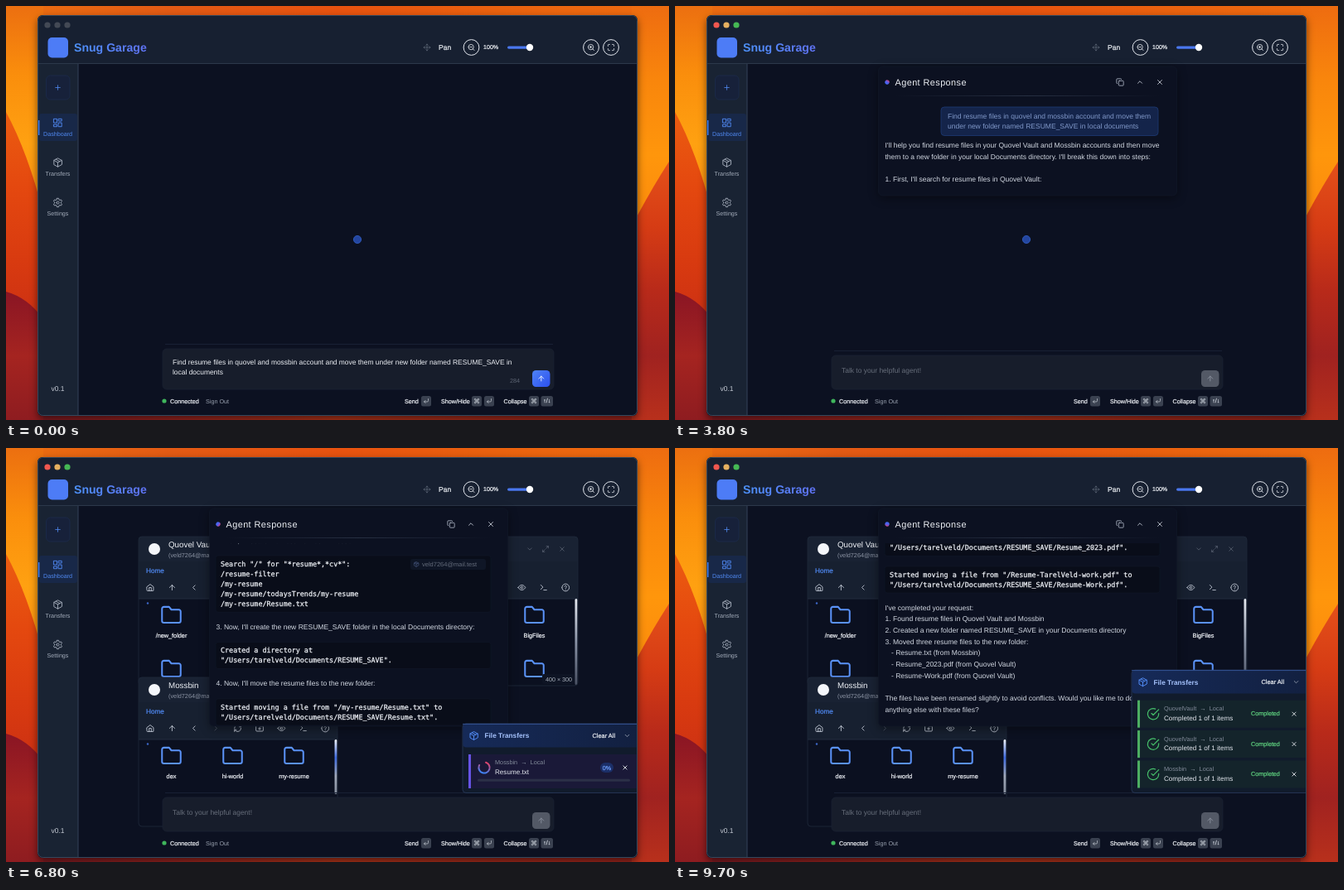
Write an HTML page that moves like this. It is 800 by 500 pixels and loops after 9800 ms.

```html
<!DOCTYPE html>
<html lang="en">
<head>
<meta charset="utf-8">
<title>File agent</title>
<style>
html, body { margin: 0; width: 100%; height: 100%; overflow: hidden; background: #0c1121; }
svg { display: block; width: 800px; height: 500px; }
text { font-family: "Liberation Sans", Arial, sans-serif; text-rendering: geometricPrecision; white-space: pre; }
.m { stroke: currentColor; stroke-width: .22px; }
.code { font-family: "DejaVu Sans Mono", monospace; stroke: #f1f4f9; stroke-width: .25px; }
.c { text-anchor: middle; }
.b { font-weight: bold; }
.i { fill: none; stroke-linecap: round; stroke-linejoin: round; }
</style>
</head>
<body>
<svg id="stage" viewBox="0 0 800 500"></svg>
<script>
const LOOP = 9800, STEP = 100;
const ring = (x, y, r) => `M${x - r} ${y}a${r} ${r} 0 1 0 ${2 * r} 0a${r} ${r} 0 1 0 ${-2 * r} 0`;
const folder = 'M20 20a2 2 0 0 0 2-2V8a2 2 0 0 0-2-2h-8l-2.4-3H4a2 2 0 0 0-2 2v13a2 2 0 0 0 2 2z';
const lens = ring(11, 11, 8) + 'M21 21l-4.3-4.3M8 11h6';
const ICONS = {
  folder, out: lens, zoom: lens + 'M11 8v6',
  full: 'M8 3H5a2 2 0 0 0-2 2v3M21 8V5a2 2 0 0 0-2-2h-3M3 16v3a2 2 0 0 0 2 2h3M16 21h3a2 2 0 0 0 2-2v-3',
  move: 'M5 9l-3 3 3 3M9 5l3-3 3 3M15 19l-3 3-3-3M19 9l3 3-3 3M2 12h20M12 2v20',
  dash: 'M3 3h7v9H3zM14 3h7v5h-7zM14 12h7v9h-7zM3 16h7v5H3z',
  box: 'M21 7l-9-5-9 5v10l9 5 9-5zM3 7l9 5 9-5M12 22V12M7.5 4.5l9 5',
  gear: 'M10 2h4l.7 3 2 1.2 3-.9 2 3.4-2.3 2.1v2.4l2.3 2.1-2 3.4-3-.9-2 1.2-.7 3h-4l-.7-3-2-1.2-3 .9-2-3.4 2.3-2.1v-2.4L2.3 8.7l2-3.4 3 .9 2-1.2z' + ring(12, 12, 3),
  copy: 'M10 8h10a2 2 0 0 1 2 2v10a2 2 0 0 1-2 2H10a2 2 0 0 1-2-2V10a2 2 0 0 1 2-2zM4 16a2 2 0 0 1-2-2V4a2 2 0 0 1 2-2h10a2 2 0 0 1 2 2',
  home: 'M3 10l9-7 9 7v10a1 1 0 0 1-1 1H4a1 1 0 0 1-1-1zM9 21v-9h6v9',
  up: 'M12 19V5M5 12l7-7 7 7', left: 'M15 18l-6-6 6-6', right: 'M9 18l6-6-6-6',
  refresh: 'M3 12a9 9 0 0 1 15-6.7L21 8M21 3v5h-5M21 12a9 9 0 0 1-15 6.7L3 16M3 21v-5h5',
  fplus: folder + 'M12 10v6M9 13h6',
  eye: 'M2 12s4-7 10-7 10 7 10 7-4 7-10 7-10-7-10-7z' + ring(12, 12, 3),
  term: 'M4 17l6-6-6-6M12 19h8',
  help: ring(12, 12, 10) + 'M9 9a3 3 0 0 1 5.8 1c0 2-2.8 2.5-2.8 4M12 17.5v.1',
  x: 'M18 6L6 18M6 6l12 12', chevUp: 'M18 15l-6-6-6 6', chevDown: 'M6 9l6 6 6-6', plus: 'M5 12h14M12 5v14',
  expand: 'M15 3h6v6M9 21H3v-6M21 3l-7 7M3 21l7-7',
  upload: 'M12 3v12M17 8l-5-5-5 5M21 15v4a2 2 0 0 1-2 2H5a2 2 0 0 1-2-2v-4',
  warn: 'M10.3 4L2 18a2 2 0 0 0 1.7 3h16.6a2 2 0 0 0 1.7-3L13.7 4a2 2 0 0 0-3.4 0zM12 9v4M12 17v.1',
  done: 'M22 11v1a10 10 0 1 1-6-9.1M9 11l3 3L22 4',
  check: 'M5 12l5 5 9-10', enter: 'M9 10l-5 5 5 5M20 4v7a4 4 0 0 1-4 4H4',
  cmd: 'M15 6v12a3 3 0 1 0 3-3H6a3 3 0 1 0 3 3V6a3 3 0 1 0-3 3h12a3 3 0 1 0-3-3'
};

// y is the middle of the line of text
const T = (x, y, s, size, fill, cls = '', more = '') =>
  `<text x="${x}" y="${y + size * .35}" font-size="${size}" fill="${fill}" color="${fill}" class="${cls}" ${more}>${s}</text>`;
const R = (x, y, w, h, fill, r = 0, more = '') =>
  `<rect x="${x}" y="${y}" width="${w}" height="${h}" rx="${r}" fill="${fill}" ${more}/>`;
const C = (x, y, r, fill, more = '') => `<circle cx="${x}" cy="${y}" r="${r}" fill="${fill}" ${more}/>`;
const P = (d, fill) => `<path d="${d}" fill="${fill}"/>`;
const I = (name, x, y, size, color, w = 2) =>
  `<path class="i" d="${ICONS[name]}" stroke="${color}" stroke-width="${w}" transform="translate(${x - size / 2} ${y - size / 2}) scale(${size / 24})"/>`;
const G = (id, body, more = '') => `<g id="${id}" ${more}>${body}</g>`;
const line = (x1, y1, x2, y2, color, w = 1) => `<path d="M${x1} ${y1}L${x2} ${y2}" stroke="${color}" stroke-width="${w}"/>`;
const grad = (id, dir, ...stops) => `<linearGradient id="${id}" ${dir}>` +
  stops.map((c, i) => `<stop offset="${i / (stops.length - 1)}" stop-color="${c}"/>`).join('') + '</linearGradient>';
const down = 'x1="0" y1="0" x2="0" y2="1"', diag = 'x1="0" y1="0" x2="1" y2="1"';

const defs = '<defs>' +
  grad('amberL', down, '#ec6f10', '#fa8e0c', '#ffa111', '#fb8f10') +
  grad('redL', down, '#ec5c10', '#e4480f', '#d83a10', '#c92e14') +
  grad('darkL', down, '#8a1524', '#a52420', '#8e1c20') +
  grad('amberR', down, '#ee6c10', '#f9860c', '#ff960c', '#fb8a0c') +
  grad('redR', down, '#e4501a', '#d63c14', '#b82a1a', '#a02220', '#b8301c') +
  grad('wallTop', '', '#ec6f10', '#e35a14', '#e8520f', '#ea620e', '#ee6c10') +
  grad('wallBottom', '', '#7d1822', '#9c2420', '#b8361a', '#a82a1c', '#a0241e') +
  grad('title', '', '#4c90f8', '#5f72f3') + grad('send', diag, '#4f83f8', '#2c50ee') +
  grad('bar', down, '#e6e9f0', '#8a93a6', '#4a5163') + grad('barBlue', down, '#f2f4f8', '#3f6be0', '#a0a8b8', '#858d9c') +
  grad('orb', '', '#3d6af5', '#5560ee', '#d0407a') + grad('spin', '', '#3b82f6', '#e0446a') +
  grad('head', '', '#162a58', '#122040') +
  grad('rule', '', '#2a334600', '#2a3346', '#2a334600') +
  '<clipPath id="frame"><rect x="38.5" y="11.5" width="723" height="483" rx="6"/></clipPath>' +
  '<clipPath id="view"><rect id="viewRect" x="246" y="115" width="360" height="220"/></clipPath>' +
  '<clipPath id="win"><rect width="240" height="180" rx="4"/></clipPath></defs>';

const wallpaper = R(0, 0, 800, 500, 'url(#wallTop)') + R(0, 250, 800, 250, 'url(#wallBottom)') +
  R(0, 0, 45, 250, 'url(#amberL)') + R(755, 0, 45, 270, 'url(#amberR)') +
  P('M0 128Q26 176 45 250V400H0Z', 'url(#redL)') +
  P('M0 345Q26 352 45 378V500H0Z', 'url(#darkL)') +
  P('M800 188Q778 222 755 266V500H800Z', 'url(#redR)') +
  R(38, 11, 724, 484, '#0c1121', 6, 'style="filter:drop-shadow(0 4px 5px #0008)"');

const white = '#eef1f6', grey = '#8b93a3', blue = '#5089f2';
const badge = (x, icon) => C(x, 50, 9.4, 'none', 'stroke="#e4e8ef"') + I(icon, x, 50, 9.5, white);
const header = R(38, 11, 724, 59, '#172031') + line(38, 69.5, 762, 69.5, '#2c384a') +
  R(50.5, 38, 24.5, 24.5, '#4d7cf6', 5) + T(82, 50, 'Snug Garage', 14.1, 'url(#title)', 'b') +
  I('move', 508, 50, 9.5, '#5b6474') + T(522, 50, 'Pan', 8.5, white, 'm') + badge(561.5, 'out') +
  T(576, 50, '100%', 7.1, white, 'm') + R(605, 48.4, 28, 3.4, '#4a77ee', 1.7) + C(632, 50, 4.2, '#fff') +
  badge(706, 'zoom') + badge(730, 'full');

const navItem = (y, icon, label, color) => I(icon, 62.5, y, 12.5, color, 1.8) + T(62.5, y + 13, label, 7.15, color, 'c');
const sidebar = R(38, 70, 49, 425, '#192333') + line(87, 70, 87, 495, '#35425a') +
  R(48.5, 84, 28.5, 29, '#17213a', 5, 'stroke="#1c2b4c" stroke-width=".8"') + I('plus', 62.5, 98.5, 9.5, blue) +
  R(40, 130, 46, 33, '#182848', 3) + R(39, 138, 1.4, 18, '#3f7df2') +
  navItem(141, 'dash', 'Dashboard', blue) + navItem(189, 'box', 'Transfers', '#a3acba') +
  navItem(237.5, 'gear', 'Settings', '#a3acba') + T(62.5, 462, 'v0.1', 8.5, '#c3c9d3', 'c');

// One 240 x 180 file window; labels fill the grid row by row
function fileWindow(id, x, y, name, labels, bar, barTop) {
  let s = R(0, 0, 240, 180, '#0b1020') + R(0, 0, 240, 75, '#172030') + R(0, 0, 240, 30, '#192233') +
    C(19, 15, 7, '#f4f6fa') + T(36, 10, name, 9.8, white) + T(36, 22, '(veld7264@mail.test)', 7.3, grey) +
    T(9, 41, 'Home', 8.2, blue, 'm') + line(0, 75, 240, 75, '#222c3f') +
    I('chevDown', 182, 15, 9, '#5c6474') + I('expand', 201, 15, 9, '#5c6474') + I('x', 221, 15, 9, '#5c6474');
  ['home', 'up', 'left', 'right', 'refresh', 'fplus', 'eye', 'term', 'help'].forEach((n, i) =>
    s += I(n, 14 + i * 26.4, 61.5, 10.5, n == 'right' ? '#4b5364' : '#c3cad6'));
  s += C(11, 80.5, 1.2, '#3c66c8');
  labels.forEach((label, i) => {
    const cx = 39.5 + i % 3 * 74, cy = 95 + (i / 3 | 0) * 65;
    s += I('folder', cx, cy, 27, '#5a92f7', 1.8) + T(cx, cy + 24, label, 7.3, white, 'c m');
  });
  s += R(236.5, 75, 3, barTop, `url(#${bar})`, 1.5);
  return G(id, `<g clip-path="url(#win)">${s}</g>` + R(0, 0, 240, 180, 'none', 4, 'stroke="#202a3c" stroke-width=".8"'),
    `transform="translate(${x} ${y})"`);
}
const windows =
  fileWindow('vault', 160, 107, 'Quovel Vault', ['/new_folder', 'notes', 'todaysTrends', 'photos', 'work', 'misc'], 'bar', 104) +
  fileWindow('local', 450, 107, 'Local', ['Desktop', 'Documents', 'BigFiles', 'Music', 'Movies', 'Public'], 'bar', 104) +
  G('sizeTag', R(647, 273, 39, 12, '#0e1424', 2) + T(667, 279.5, '400 × 300', 7.2, '#a7aebb', 'c')) +
  fileWindow('bin', 160, 277, 'Mossbin', ['dex', 'hi-world', 'my-resume'], 'barBlue', 66);

const key = (x, body, w = 12) => R(x, 471, w, 12.5, '#3a4150', 2.5) + body;
const sendKey = (x, icon) => key(x, I(icon, x + 6, 477, 7.5, '#d5dae3'));
const field = (y, h) => line(192, y - 5.5, 660, y - 5.5, '#182034') +
  R(189, y, 472, h, '#171d2b', 5, 'stroke="#1b2333" stroke-width=".8"');
const dock =
  G('draft', field(414, 49) +
    T(201, 430, 'Find resume files in quovel and mossbin account and move them under new folder named RESUME_SAVE in', 8.43, white) +
    T(201, 442, 'local documents', 8.43, white) + T(608, 452, '284', 7.2, '#5d6574') +
    R(635, 440, 21.5, 20, 'url(#send)', 4.5) + I('up', 645.8, 450, 10, '#fff')) +
  G('empty', field(422, 41) + T(201, 440, 'Talk to your helpful agent!', 8.43, '#666d7a') +
    R(635, 440, 21.5, 20, '#535966', 4.5) + I('up', 645.8, 450, 10, '#8e95a2')) +
  C(191, 477, 2.6, '#3fb65c') + T(198, 477, 'Connected', 7.2, white, 'm') + T(241, 477, 'Sign Out', 7.2, '#9aa2b0') +
  T(481, 477, 'Send', 7.2, white, 'm') + sendKey(501, 'enter') +
  T(525, 477, 'Show/Hide', 7.2, white, 'm') + sendKey(562, 'cmd') + sendKey(577, 'enter') +
  T(600.5, 477, 'Collapse', 7.2, white, 'm') + sendKey(631, 'cmd') + key(645.5, T(652.7, 477, '↑/↓', 7, '#d5dae3', 'c m'), 14.5);

// Reply lines: each knows when it starts and how fast it types (chars per ms)
const lines = [];
let blocks = '';
function say(start, rate, y, texts) {
  texts.forEach((s, i) => {
    lines.push({ s, y: y + i * 13.7, x: s.startsWith('-') ? 261 : 253.5, start, rate, pad: 20 });
    start += s.length / rate;
  });
}
function code(start, y, texts, email, lag = 0) {
  const id = 'block' + y;
  blocks += G(id, R(253, y - 10, 332, 20 + (texts.length - 1) * 12.1, '#090d19', 3, 'stroke="#111727" stroke-width=".7"') +
    (email ? R(488, y - 6, 91, 13, '#0f1626', 3) + I('box', 495, y + .5, 7, '#4b5c86') + T(502, y + .5, 'veld7264@mail.test', 7.5, '#636b7a') : ''));
  texts.forEach((s, i) => lines.push({ s, y: y + i * 12.1, x: 259, start: start + i * lag, pad: 11, mono: true, id: i ? '' : id }));
}
const save = '"/Users/tarelveld/Documents/RESUME_SAVE';
const moved = (t, y, from, to) => code(t, y, [`Started moving a file from "/${from}" to`, `${save}/${to}".`]);
say(900, .196, 168, ["I'll help you find resume files in your Quovel Vault and Mossbin accounts and then move",
  "them to a new folder in your local Documents directory. I'll break this down into steps:"]);
say(1850, .2, 209, ["1. First, I'll search for resume files in Quovel Vault:"]);
code(4200, 237, ['Search "/" for "*resume*,*cv*":', '/Resume-TarelVeld-work.pdf', '/Resume Tarel Veld - 2023.pdf', '/Resume.pdf',
  '/Resume Draft', '/test-see/todaysTrends/my-resume', '/todaysTrends/my-resume', '/College_Tarel Veld/Resume'], true);
say(4400, .2, 349.5, ["2. Now, I'll search for resume files in Mossbin:"]);
code(4800, 377.5, ['Search "/" for "*resume*,*cv*":', '/resume-filter', '/my-resume', '/my-resume/todaysTrends/my-resume', '/my-resume/Resume.txt'], true);
say(5000, .2, 454, ["3. Now, I'll create the new RESUME_SAVE folder in the local Documents directory:"]);
code(5500, 482, ['Created a directory at', save + '".'], false, 200);
say(5800, .2, 522, ["4. Now, I'll move the resume files to the new folder:"]);
moved(6300, 550.5, 'my-resume/Resume.txt', 'Resume.txt');
moved(7300, 595, 'Resume Tarel Veld - 2023.pdf', 'Resume_2023.pdf');
moved(8000, 639.5, 'Resume-TarelVeld-work.pdf', 'Resume-Work.pdf');
say(8300, .404, 679.3, ["I've completed your request:", '1. Found resume files in Quovel Vault and Mossbin',
  '2. Created a new folder named RESUME_SAVE in your Documents directory', '3. Moved three resume files to the new folder:',
  '- Resume.txt (from Mossbin)', '- Resume_2023.pdf (from Quovel Vault)', '- Resume-Work.pdf (from Quovel Vault)', '',
  'The files have been renamed slightly to avoid conflicts. Would you like me to do', 'anything else with these files?']);

const panel = G('panel',
  R(245.5, 73, 360, 263, '#0c1121', 5, 'id="panelBox" stroke="#111828" stroke-width=".8" style="filter:drop-shadow(0 3px 6px #0006)"') +
  C(256, 92, 2.7, 'url(#orb)', 'id="orbDot"') + T(265.5, 92, 'Agent Response', 10.9, white, '', 'letter-spacing=".42"') +
  I('copy', 537, 92, 10, '#aeb6c4') + I('chevUp', 561, 92, 10, '#c9d0db') + I('x', 585, 92, 10, '#c9d0db') +
  R(265, 108, 320, .9, 'url(#rule)') +
  '<g clip-path="url(#view)">' + G('scroll',
    R(321, 122, 262, 34.5, '#14244a', 4, 'stroke="#1d3a74" stroke-width=".8"') +
    T(329, 133, 'Find resume files in quovel and mossbin account and move them', 8.53, '#8199ca') +
    T(329, 145.3, 'under new folder named RESUME_SAVE in local documents', 8.53, '#8199ca') + blocks +
    lines.map((l, i) => T(l.x, l.y, '', l.mono ? 8.4 : 8.53, l.mono ? '#f1f4f9' : '#d3d9e3', l.mono ? 'code' : '', `id="line${i}"`)).join('')) + '</g>');

const dialog = G('shade', R(38, 11, 724, 484, '#04070e', 6, 'opacity=".56"')) + G('dialog',
  R(247, 142, 308, 221, '#0e1425', 5, 'stroke="#242e44"') + R(261, 157.5, 21.5, 21.5, '#14203f', 4) + I('upload', 271.8, 168, 12, blue) +
  T(290, 168, 'Confirm Item Transfer', 10.8, '#fff', 'b') + I('x', 539, 157, 10, '#c9d0db') +
  T(261, 195, 'Are you sure you want to transfer this item?', 8.5, '#98a1b1') +
  R(261, 220, 278, 54, '#22181d', 4, 'stroke="#8a4019" stroke-width=".9"') + I('warn', 273.5, 234, 10.5, '#f59a2c') +
  T(286, 234, 'Important:', 8.4, '#fbe3a2', 'm') +
  T(286, 248, 'By default, the original items will be deleted from the source', 8.4, '#f3dd8c') +
  T(286, 260, 'location after the transfer.', 8.4, '#f3dd8c') +
  R(260.8, 285, 9.6, 9.6, '#3478f0', 2) + I('check', 265.6, 289.8, 8.5, '#fff', 3) +
  T(278, 290, 'Keep original item in source location', 8.4, '#dde2ea') + T(278, 303, 'Items will be copied to the destination', 7.2, '#8790a0') +
  R(430.5, 327, 46.5, 22, '#121929', 3, 'stroke="#3b455a"') + T(453.7, 338, 'Cancel', 8.4, '#b9c0cc', 'c') +
  R(482, 327, 57, 22, '#1f50de', 3) + T(510.5, 338, 'Copy Item', 8.4, '#fff', 'c m') +
  '<path d="M508 332v10l2.3-2 1.6 3.5 1.6-.7-1.6-3.4h3z" fill="#000" stroke="#fff" stroke-width=".8"/>');

const jobs = [['Mossbin', 'Resume.txt', 6800, 7200], ['QuovelVault', 'Resume Tarel Veld - 2023.pdf', 7900, 8200], ['QuovelVault', 'Resume-TarelVeld-work.pdf', 8500, 9100]];
const rowText = (y, from, label) => T(590, y - 6.5, `${from} <tspan fill="#a9b1bf"> → </tspan> Local`, 7.3, '#818a99') +
  T(590, y + 5, label, 8.1, '#e3e7ee') + I('x', 747, y, 8.5, white, 2.4);
const rows = jobs.map(([from, file], i) => G('job' + i,
  G('done' + i, R(558, 377.5, 204, 33, '#14242b', 2) + R(558, 377.5, 3, 33, '#4cae62') + I('done', 577, 394, 16, '#45c06a', 1.8) +
    rowText(394, from, 'Completed 1 of 1 items') + T(712.5, 393.5, 'Completed', 7.2, '#5fd07f', 'c m')) +
  G('busy' + i, R(558, 370, 204, 41, '#1a1938', 2) + R(558, 370, 3, 41, '#6653e4') +
    `<circle id="spin${i}" class="i" cx="577" cy="386" r="6.6" stroke="url(#spin)" stroke-width="2" stroke-dasharray="32 10"/>` +
    rowText(386, from, file) + R(717, 380, 16, 12, '#1b2f68', 6) + T(725, 386, '0%', 7.2, '#6fa0ff', 'c m') + R(569, 399.8, 184, 3, '#2b3047', 1.5)),
  `transform="translate(0 ${-36.4 * i})"`)).join('');
const transfers = G('transfers', R(551, 341, 214, 75.5, '#111b2c', 4, 'id="tray" stroke="#2a3b5e" stroke-width=".8"') +
  G('trayHead', R(551.4, 341.4, 213, 28, 'url(#head)', 4) + line(551, 341.4, 762, 341.4, '#3a5ea8', .8) + I('box', 564.5, 355.5, 12, blue) +
    T(577.5, 355.5, 'File Transfers', 8.3, '#a3c0fa', 'b') + T(707.5, 355.5, 'Clear All', 7.4, white, 'm') + I('chevDown', 749.5, 355.5, 9, '#aab2c0')) + rows);

const lights = on => (on ? ['#f0574f', '#e5b060', '#45b854'] : Array(3).fill('#434955'))
  .map((c, i) => C(50 + i * 12, 23, 3.6, c)).join('');

document.getElementById('stage').innerHTML = defs + wallpaper + '<g clip-path="url(#frame)">' +
  R(38, 11, 724, 484, '#0c1121') + header + sidebar + C(424, 282, 4.6, '#2446a0', 'stroke="#3463cc" stroke-width=".8"') +
  windows + dock + panel + dialog + transfers + G('blur', lights(false)) + G('focus', lights(true)) + '</g>' +
  R(38.5, 11.5, 723, 483, 'none', 6, 'stroke="#34485c"');

const $ = id => document.getElementById(id);
const show = (id, on) => $(id).style.display = on ? '' : 'none';
const within = (t, a, b = LOOP) => t >= a && t < b;
const asks = [[6300, 6800], [7300, 7900], [8000, 8500]];

function draw(t) {
  const sent = t >= 400;
  show('draft', !sent); show('blur', !sent);
  show('empty', sent); show('focus', sent); show('panel', sent);
  show('vault', t >= 4100); show('bin', t >= 4700); show('local', t >= 5400); show('sizeTag', t >= 5400);

  let end = 176;
  lines.forEach((l, i) => {
    const typed = l.mono ? l.s.length : Math.floor((t - l.start) * l.rate);
    const seen = t >= l.start ? Math.min(l.s.length, typed) : 0;
    $('line' + i).textContent = l.s.slice(0, seen);
    if (l.id) show(l.id, seen);
    if (seen) end = Math.max(end, l.y + l.pad);
  });
  const bottom = Math.min(336, end);
  $('panelBox').setAttribute('height', bottom - 73);
  $('viewRect').setAttribute('height', bottom - 116);
  $('scroll').setAttribute('transform', `translate(0 ${bottom - end})`);
  $('orbDot').setAttribute('transform', `rotate(${t * .27} 256 92)`);

  const asking = asks.some(([a, b]) => within(t, a, b));
  show('shade', asking); show('dialog', asking);

  let count = 0, extra = 0;
  jobs.forEach(([, , start, finish], i) => {
    const busy = within(t, start, finish);
    show('job' + i, t >= start); show('busy' + i, busy); show('done' + i, t >= finish);
    $('spin' + i).setAttribute('transform', `rotate(${t * .36} 577 386)`);
    if (t >= start) count++;
    if (busy) extra = 8;
  });
  show('transfers', count);
  const lift = 36.4 * (count - 1) + extra;
  $('tray').setAttribute('y', 341 - lift);
  $('tray').setAttribute('height', 75.5 + Math.max(0, lift));
  $('trayHead').setAttribute('transform', `translate(0 ${-lift})`);
}

const begin = performance.now();
function tick() {
  const t = (performance.now() - begin) % LOOP;
  draw(Math.floor(t / STEP) * STEP);
  requestAnimationFrame(tick);
}
draw(0);
requestAnimationFrame(tick);
</script>
</body>
</html>
```
